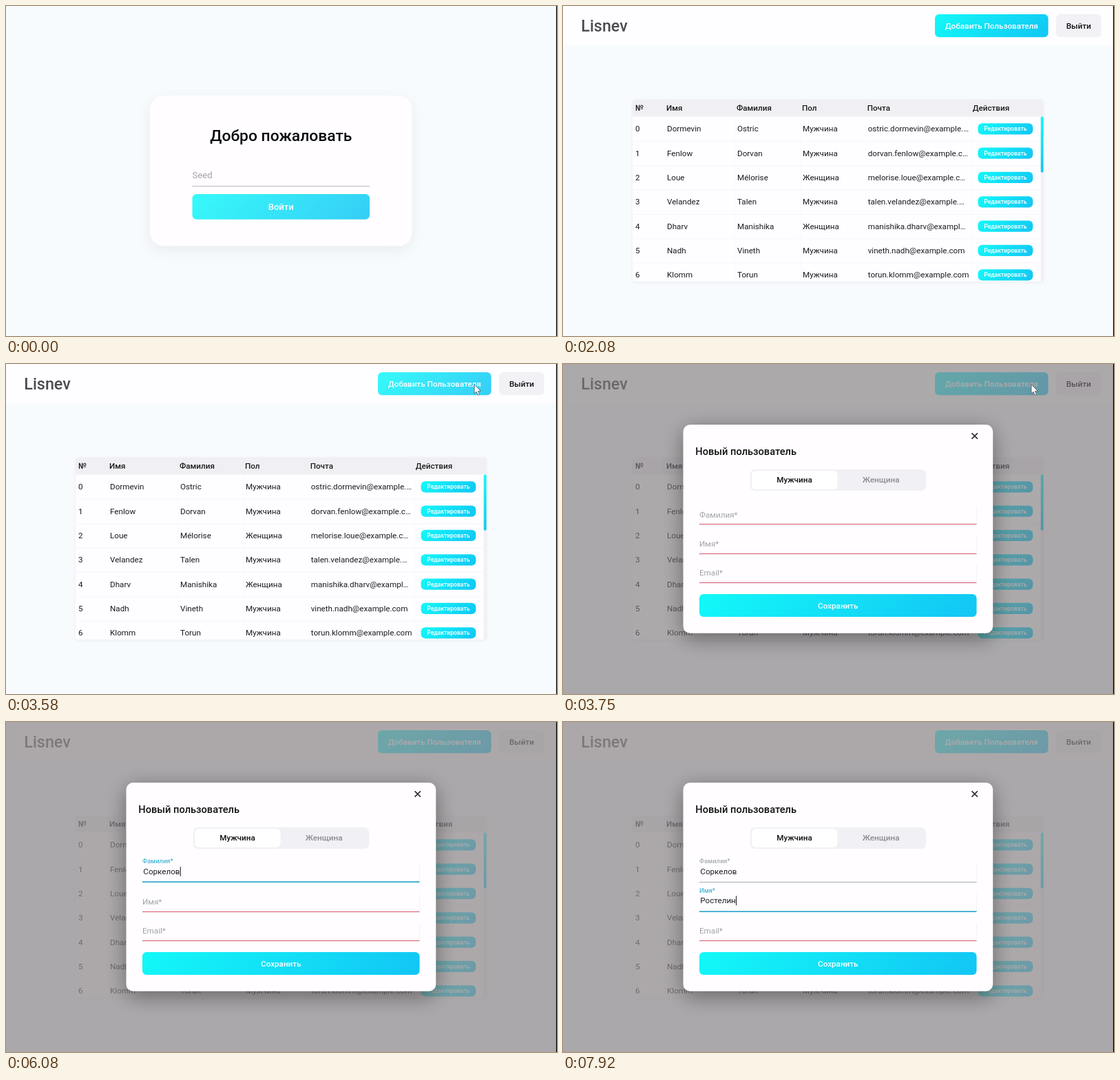
Write an HTML page that moves like this. It is 800 px wide and 479 px high and loops after 8 s.

```html
<!DOCTYPE html>
<html lang="ru">
<head>
<meta charset="utf-8">
<style>
html, body { margin: 0; width: 100%; height: 100%; overflow: hidden; background: #f7fbfe; }
svg { display: block; width: 100vw; height: 100vh; }
text { font-family: Roboto, Arial, sans-serif; font-size: 11.67px; fill: #1c1c1e; white-space: pre; }
.m { font-weight: 500; }
</style>
</head>
<body>
<svg id="stage" viewBox="0 0 800 479">
  <defs>
    <filter id="soft" x="-20%" y="-30%" width="140%" height="160%"><feGaussianBlur stdDeviation="11"/></filter>
    <filter id="wide" x="-20%" y="-30%" width="140%" height="160%"><feGaussianBlur stdDeviation="15"/></filter>
    <filter id="thin" x="-10%" y="-10%" width="120%" height="120%"><feGaussianBlur stdDeviation="2.5"/></filter>
  </defs>
</svg>
<script>
const LOOP = 8000;
const stage = document.getElementById('stage');
const defs = stage.querySelector('defs');
const TEAL = '#1fa9cb', PALE = '#f1f1f6', WHITE = '#fffdff';

function el(parent, tag, attrs = {}, label) {
  const node = document.createElementNS('http://www.w3.org/2000/svg', tag);
  set(node, attrs);
  if (label !== undefined) node.textContent = label;
  parent.appendChild(node);
  return node;
}
function set(node, attrs) {
  for (const k in attrs) node.setAttribute(k, attrs[k]);
}
const rect = (p, x, y, width, height, fill, rx = 0, more = {}) =>
  el(p, 'rect', { x, y, width, height, fill, rx, ...more });
const text = (p, x, y, label, more = {}) => el(p, 'text', { x, y, ...more }, label);
const medium = (p, x, y, label, more = {}) => text(p, x, y, label, { class: 'm', ...more });
const show = (node, on) => { node.style.display = on ? '' : 'none'; };
const clamp = v => Math.max(0, Math.min(1, v));
const ramp = (t, a, b) => clamp((t - a) / (b - a));
const ease = v => v * v * (3 - 2 * v);
const mix = (a, b, k) => a + (b - a) * k;

// 135 degree gradient laid out as CSS does it
let gradients = 0;
function gradient(x, y, w, h) {
  const id = 'g' + gradients++, cx = x + w / 2, cy = y + h / 2, d = (w + h) / 4;
  const g = el(defs, 'linearGradient', {
    id, gradientUnits: 'userSpaceOnUse', x1: cx - d, y1: cy - d, x2: cx + d, y2: cy + d
  });
  el(g, 'stop', { offset: 0, 'stop-color': '#13f9f8' });
  el(g, 'stop', { offset: 1, 'stop-color': '#12c5f4' });
  return `url(#${id})`;
}
function button(p, x, y, w, h, label, size, drop) {
  const face = rect(p, x, y, w, h, gradient(x, y, w, h), 6);
  medium(p, x + w / 2, y + h / 2 + drop, label,
    { 'text-anchor': 'middle', style: `fill:#fff;font-size:${size}px` });
  return face;
}

// Text field with floating label
function field(p, x, right, base, size, label, idle) {
  const line = rect(p, x, 0, right - x, 1, idle);
  const tag = text(p, x, base, label);
  const value = text(p, x + 1.3, base - 1.7, '', { style: `font-size:${size}px` });
  const caret = rect(p, 0, base - 1.7 - size * 0.93, 1, size * 1.17, '#111');
  const rule = Math.round(base + size * 0.88 - 0.5);
  return {
    draw(up, focus, typed, blink) {
      const left = up === 1 && !focus;
      set(line, focus
        ? { y: rule - 0.7, height: 1.7, fill: '#2fa6cb' }
        : { y: rule, height: 1, fill: left ? '#a9a9ae' : idle });
      tag.setAttribute('y', base - size * 1.48 * up);
      tag.style.fontSize = size * mix(1, 0.8, up) + 'px';
      tag.style.fill = focus ? TEAL : left ? '#909ba1' : '#a2a2a7';
      if (value.textContent !== typed) value.textContent = typed;
      const end = typed ? value.getComputedTextLength() : -0.8;
      caret.setAttribute('x', x + 1.5 + end);
      show(caret, focus && blink);
    }
  };
}

rect(stage, 0, 0, 800, 479, '#f7fbfe');

// Login page
const login = el(stage, 'g');
rect(login, 209, 136, 380.5, 219, '#000', 20, { opacity: 0.06, filter: 'url(#soft)' });
rect(login, 209, 130, 380.5, 218.5, WHITE, 20);
medium(login, 399.3, 196.3, 'Добро пожаловать',
  { 'text-anchor': 'middle', style: 'fill:#09090b;font-size:22.8px' });
const seed = field(login, 270.5, 528, 250, 13.1, 'Seed', '#bcbbc1');
const enter = button(login, 270.5, 273, 257.5, 36.7, 'Войти', 13, 4.5);

// Table page
const home = el(stage, 'g');
rect(home, 0, 0, 800, 57, '#fefdff');
medium(home, 26.3, 37, 'Lisnev', { style: 'fill:#4b4b50;font-size:23.3px' });
const add = button(home, 540, 12, 164.5, 33.3, 'Добавить Пользователя', 11.67, 4);
rect(home, 716, 12, 65.3, 33.3, PALE, 6);
medium(home, 748.7, 32.7, 'Выйти', { 'text-anchor': 'middle', style: 'fill:#111' });

rect(home, 101, 137, 596.5, 264, '#000', 3, { opacity: 0.06, filter: 'url(#thin)' });
rect(home, 101, 135.5, 596.5, 264.5, '#fefdff', 3);
rect(home, 101, 135.5, 596.5, 25, '#f0f0f4', 3);
const columns = [105, 150, 252, 347, 441.7, 594.7];
['№', 'Имя', 'Фамилия', 'Пол', 'Почта', 'Действия'].forEach((name, i) =>
  medium(home, columns[i], 152, name));
const people = [
  ['Dormevin', 'Ostric', 'ostric.dormevin@example.…'],
  ['Fenlow', 'Dorvan', 'dorvan.fenlow@example.c…'],
  ['Loue', 'Mélorise', 'melorise.loue@example.c…', true],
  ['Velandez', 'Talen', 'talen.velandez@example.…'],
  ['Dharv', 'Manishika', 'manishika.dharv@exampl…', true],
  ['Nadh', 'Vineth', 'vineth.nadh@example.com'],
  ['Klomm', 'Torun', 'torun.klomm@example.com']
];
for (const x of [249, 344, 439.5, 593]) rect(home, x, 161, 1, 239, '#faf9fb');
people.forEach(([name, last, mail, woman], i) => {
  const y = 178.2 + i * 35.33;
  if (i) rect(home, 101, y - 17.7, 592, 1, '#f6f5f8');
  [i, name, last, woman ? 'Женщина' : 'Мужчина', mail].forEach((cell, c) =>
    text(home, columns[c] + (c ? 1 : 0), y + 4, cell));
  button(home, 602.5, y - 8, 79.7, 16.2, 'Редактировать', 8.6, 3);
});
rect(home, 693.7, 160.5, 3.8, 239.5, '#f0f0f3');
rect(home, 693.7, 160.5, 3.8, 81, gradient(693.7, 160.5, 3.8, 81), 1.5);

// Dialog
const shade = rect(stage, 0, 0, 800, 479, '#120303', 0, { 'fill-opacity': 0.33 });
const dialog = el(stage, 'g');
rect(dialog, 175, 95, 449, 303, '#000', 12, { opacity: 0.4, filter: 'url(#wide)' });
rect(dialog, 174.5, 88, 449.7, 302.7, WHITE, 10);
el(dialog, 'path', { d: 'M593.5 100.3l8.4 8.4m0-8.4l-8.4 8.4', stroke: '#333336', 'stroke-width': 1.7 });
medium(dialog, 192.3, 132, 'Новый пользователь', { style: 'fill:#111;font-size:14.6px' });
rect(dialog, 271.7, 153, 255.5, 31, '#f1f0f5', 7);
rect(dialog, 274, 155, 124.5, 27, '#fff', 6);
medium(dialog, 336, 172.3, 'Мужчина', { 'text-anchor': 'middle', style: 'fill:#111' });
medium(dialog, 461.7, 172.3, 'Женщина', { 'text-anchor': 'middle', style: 'fill:#8d8c92' });
const [surname, given, email] = ['Фамилия*', 'Имя*', 'Email*'].map((label, i) => {
  rect(dialog, 600, 207 + i * 42.3, 0.8, 25, '#f1eff3');
  return field(dialog, 198, 600.5, 222.7 + i * 42.3, 11.67, label, '#d4586b');
});
button(dialog, 198, 334, 402.5, 33, 'Сохранить', 11.67, 4);

const pointer = el(stage, 'path', {
  d: 'M0 0V13.2L3 10.5 5.2 15.5 7.4 14.5 5.3 9.7H9.4Z',
  fill: '#fff', stroke: '#55555a', 'stroke-width': 0.8
});
rect(stage, 798.8, 0, 1.2, 479, '#000');

const typed = (word, times, t) => word.slice(0, times.filter(at => t >= at).length);
const SEED_KEYS = [330, 580, 920, 1080, 1250, 1500];
const SURNAME_KEYS = [5250, 5420, 5500, 5750, 5830, 5920, 6000, 6080];
const NAME_KEYS = [6670, 7000, 7170, 7250, 7330, 7500, 7580, 7750];

function pointerAt(t) {
  if (t < 3250) {
    const k = ease(ramp(t, 2500, 3250));
    return [mix(321, 640, k), mix(283, 296, k)];
  }
  const k = ease(ramp(t, 3250, 3540));
  return [mix(640, 680, k), mix(296, 29.7, k)];
}

function draw(t) {
  const inside = t >= 1750, open = t >= 3750;
  show(login, !inside);
  show(home, inside);
  show(shade, open);
  show(dialog, open);

  if (!inside) {
    seed.draw(ease(ramp(t, 70, 230)), t >= 80, typed('Lisnev', SEED_KEYS, t), true);
    enter.setAttribute('opacity', mix(0.85, 1, ramp(t, 80, 170)));
  }
  // The page behind the dialog fades as well as darkens
  home.setAttribute('opacity', open ? mix(0.55, 0.4, ramp(t, 3750, 4250)) : 1);
  if (open) {
    const next = t >= 6250;
    const blink = t < 4670 || t >= 5000;
    surname.draw(ease(ramp(t, 4230, 4400)), t >= 4250 && !next, typed('Соркелов', SURNAME_KEYS, t), blink);
    given.draw(ease(ramp(t, 6230, 6400)), next, typed('Ростелин', NAME_KEYS, t), true);
    email.draw(0, false, '', false);
  }

  const [x, y] = pointerAt(t);
  pointer.setAttribute('transform', `translate(${x} ${y})`);
  show(pointer, t >= 2500 && t < 5250);
  const hover = ramp(t, 3480, 3560) * (1 - ramp(t, 3750, 4000));
  add.setAttribute('opacity', 1 - 0.15 * hover);
}

let start;
function tick(now) {
  if (start === undefined) start = now;
  draw((now - start) % LOOP);
  requestAnimationFrame(tick);
}
draw(0);
requestAnimationFrame(tick);
</script>
</body>
</html>
```
